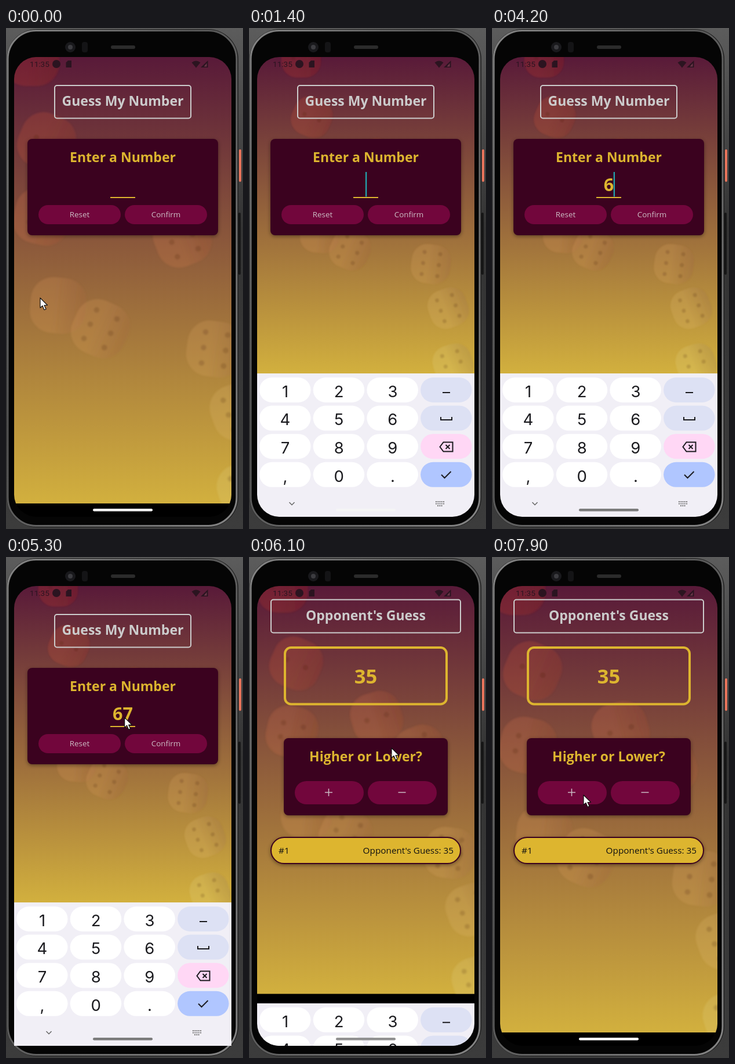
Recreate the animation shown at these times as an HTML page. Size 409 by 863 pixels, loop 8 s.

```html
<!DOCTYPE html>
<html lang="en">
<head>
<meta charset="utf-8">
<title>Number guessing game</title>
<style>
html, body { margin: 0; width: 100%; height: 100%; overflow: hidden; background: #383838; }
svg { display: block; }
text { font: 13.4px "Open Sans", sans-serif; text-anchor: middle; fill: #cbbcc4; }
.title { font-size: 23px; font-weight: 700; fill: #ccc; }
.gold { font-size: 23px; font-weight: 700; fill: #ddb52f; }
.input { font-size: 30.6px; }
.guess { font-size: 34.5px; }
.log { font-size: 15.3px; fill: #111; }
.clock { font: 13.6px Roboto, sans-serif; fill: #2b1420; text-anchor: start; }
.digit { font: 27.5px Inter, sans-serif; fill: #1b1b1f; }
.frame { fill: none; stroke: #ccc; stroke-width: 2; }
.card { fill: #3b021f; }
.raised { filter: drop-shadow(0 2px 3px #0006); }
.button { fill: #72063c; }
.line { fill: none; stroke: #1b1b1f; stroke-width: 2; }
</style>
</head>
<body>
<svg width="409" height="863">
  <defs>
    <linearGradient id="wall" x2="0" y2="1"><stop stop-color="#5c5c5c"/><stop offset=".4" stop-color="#333"/><stop offset="1" stop-color="#3c3c3c"/></linearGradient>
    <linearGradient id="sky" x2="0" y2="1"><stop stop-color="#591a39"/><stop offset="1" stop-color="#d2b03e"/></linearGradient>
    <linearGradient id="rim" x2="1" y2="1"><stop stop-color="#858585"/><stop offset=".4" stop-color="#555"/><stop offset="1" stop-color="#858585"/></linearGradient>
    <linearGradient id="shade"><stop offset=".4" stop-color="#40100c" stop-opacity="0"/><stop offset="1" stop-color="#40100c" stop-opacity=".12"/></linearGradient>
    <clipPath id="screen"><rect x="14" y="50" width="375" height="792" rx="38"/></clipPath>
    <clipPath id="page"><rect x="-80" y="50" width="563" height="769"/></clipPath>
    <filter id="soft"><feGaussianBlur stdDeviation="1.5"/></filter>
  </defs>

  <rect width="409" height="863" fill="url(#wall)"/>
  <rect x="402" y="209" width="4" height="56" rx="2" fill="#e8735a"/>
  <rect x="401" y="318" width="4" height="107" rx="2" fill="#161616"/>
  <rect x="1" y="2" width="400" height="858" rx="52" fill="#1c1c1c"/>
  <rect x="3" y="4.5" width="395" height="853" rx="49" fill="#050505" stroke="url(#rim)" stroke-width="3"/>
  <circle cx="111" cy="33" r="9" fill="#19191c"/>
  <circle cx="111" cy="33" r="4" fill="#3c3c40"/>
  <rect x="131" y="24" width="10" height="18" rx="4" fill="#141416"/>
  <rect x="181" y="30" width="42" height="6" rx="3" fill="#2b2b2b"/>

  <g clip-path="url(#screen)">
    <rect x="14" y="50" width="375" height="792"/>
    <g id="backdrop">
      <g clip-path="url(#page)">
        <rect x="-80" y="50" width="563" height="769" fill="url(#sky)"/>
        <g id="dice" filter="url(#soft)"></g>
      </g>
    </g>

    <text class="clock" x="41" y="67">11:35</text>
    <g fill="#2b1420">
      <circle cx="87" cy="62" r="7"/>
      <path d="M107 56h6v12h-9.5v-8.5z"/>
      <path d="M320.5 59.5Q328 53.5 335.5 59.5L328 68.5z"/>
      <path d="M348.5 56v12h-12.5z"/>
    </g>
    <path d="M346.5 60.5v6h-5z" fill="#6a3548"/>

    <g id="start">
      <rect class="frame" x="84" y="99" width="235" height="56.5" rx="4"/>
      <text class="title" x="201.5" y="134">Guess My Number</text>
      <rect class="card raised" x="37" y="191" width="329" height="166" rx="8"/>
      <text class="gold" x="201.5" y="230.5">Enter a Number</text>
      <text class="gold input" id="entry" x="201.5" y="281"></text>
      <rect x="180" y="291" width="43" height="2" fill="#ddb52f"/>
      <rect id="caret" y="248" width="2.2" height="42.5" fill="#22a9b4"/>
      <rect class="button" x="56" y="305" width="142" height="33" rx="16.5"/>
      <text x="127" y="326">Reset</text>
      <g id="confirm">
        <rect class="button" x="205" y="305" width="142" height="33" rx="16.5"/>
        <text x="276" y="326">Confirm</text>
      </g>
    </g>

    <g id="game">
      <rect class="frame" x="38" y="73.5" width="327" height="57" rx="4"/>
      <text class="title" x="201.5" y="109">Opponent's Guess</text>
      <rect x="62" y="156" width="279" height="97.5" rx="10.5" fill="none" stroke="#ddb52f" stroke-width="4"/>
      <text class="gold guess" x="201.5" y="218">35</text>
      <rect class="card raised" x="60" y="312" width="283" height="133" rx="8"/>
      <text class="gold" x="201.5" y="352">Higher or Lower?</text>
      <rect class="button" x="79" y="386" width="119" height="40" rx="20"/>
      <rect class="button" x="205" y="386" width="119" height="40" rx="20"/>
      <path d="M131 405.500h13m-6.500-6.500v13M257.500 405.500h13" fill="none" stroke="#cbbcc4" stroke-width="1.5"/>
      <rect class="raised" x="38" y="483" width="327" height="45" rx="22.5" fill="#ddb52f" stroke="#3b021f" stroke-width="2"/>
      <text class="log" x="51" y="511" style="text-anchor:start">#1</text>
      <text class="log" x="353" y="511" style="text-anchor:end">Opponent's Guess: 35</text>
    </g>

    <g id="keyboard">
      <rect x="14" y="595" width="375" height="247" fill="#f1eff6"/>
      <g id="keys"></g>
      <path class="line" d="M334 628h13M331 670v5h19v-5M335.5 713.5h16v16h-16l-6-8zM339.5 718l7 7m0-7l-7 7M332 769.5l5.5 5.5 11-11"/>
      <path class="line" d="M69.5 817l4.5 4.5 4.5-4.5" style="stroke:#666;stroke-width:1.5"/>
      <path d="M322 816h15M322 819.5h15M325 823h9" stroke="#777" stroke-width="2" stroke-dasharray="2 1.25"/>
    </g>
    <rect id="pill" x="150" y="828" width="103" height="4.5" rx="2.2"/>
  </g>
  <path id="cursor" d="M0 0v17l4-3.500 3 7 3-1.200-3-6.800h5.500z" fill="#fff" stroke="#111" stroke-width="1.2" stroke-linejoin="round"/>
</svg>
<script>
const $ = id => document.getElementById(id);
const set = (id, name, value) => $(id).setAttribute(name, value);
const show = (id, on) => { $(id).style.display = on ? '' : 'none'; };
const range = n => [...Array(n).keys()];
const clamp = (v, lo, hi) => Math.min(hi, Math.max(lo, v));

// Soft dice: pips sit in two columns, the tint warms from red to yellow down the page
function die([x, y, pips], i) {
  const size = 96, half = size / 2, rows = Math.ceil(pips / 2);
  const face = fill => `<rect x="${-half}" y="${-half}" width="${size}" height="${size}" rx="${size * .4}" fill="${fill}"/>`;
  const dots = range(pips).map(n => `<circle r="5" opacity=".17" fill="#40200c"
    cx="${(n % 2 - .5) * size * .4}" cy="${((n >> 1) - (rows - 1) / 2) * size * .28}"/>`);
  return `<g transform="translate(${x} ${y}) rotate(${24 * Math.sin(1.3 * i)})">
    <g opacity=".22">${face(`hsl(${y / 17},65%,${48 + y / 35}%)`)}</g>${face('url(#shade)')}${dots.join('')}</g>`;
}
$('dice').innerHTML = [
  [44, 52, 1], [70, 196, 2], [62, 325, 4], [222, 298, 2], [304, 362, 6],
  [90, 478, 0], [163, 518, 6], [360, 553, 6], [402, 660, 6], [414, 796, 5]
].map(die).join('');

const sideFill = ['#dde1f4', '#dde1f4', '#ffd7f5', '#b0c6ff'];
$('keys').innerHTML = [...'123 456 789 ,0. '].map((key, i) => {
  const col = i % 4, row = i >> 2, x = 18 + col * 92.7, y = 602 + row * 48.6;
  return `<rect x="${x}" y="${y}" width="88.5" height="43" rx="21.5" fill="${col == 3 ? sideFill[row] : '#fff'}"/>
    <text class="digit" x="${x + 44.5}" y="${y + 33.7}">${key}</text>`;
}).join('');

const ramp = (t, from, to) => clamp((t - from) / (to - from), 0, 1);
const smooth = k => k * k * (3 - 2 * k);
const easeOut = k => 1 - (1 - k) ** 3;

const TAP = 1300, FIRST = 4200, SECOND = 4700, SWITCH = 6100;

function draw(t) {
  const playing = t >= SWITCH;
  show('start', !playing);
  show('game', playing);
  set('confirm', 'opacity', t >= 5900 ? .7 : 1);

  // Each key press restarts the caret's blink; it rests a while before the first digit
  const entry = '67'.slice(0, (t >= FIRST) + (t >= SECOND));
  const rest = entry ? 0 : clamp(t - 2400, 0, 900);
  const age = t - rest - [TAP, FIRST, SECOND][entry.length];
  $('entry').textContent = entry;
  set('caret', 'x', 201 + entry.length * 8.75);
  show('caret', age >= 0 && Math.floor(age / 500) % 2 == 0);

  // The page shrinks to the space above the keyboard
  const up = easeOut(ramp(t, 1100, 1400)) - easeOut(ramp(t, 6000, 6300));
  set('backdrop', 'transform', `translate(201.5 50) scale(${1 - .291 * up}) translate(-201.5 -50)`);
  set('keyboard', 'transform', `translate(0 ${247 * (1 - up)})`);

  const grey = 245 - 122 * ramp(t, 2000, 2400) + 67 * ramp(t, 6000, 6300) + 65 * ramp(t, 6900, 7700);
  set('pill', 'fill', `rgb(${grey},${grey},${grey})`);

  const toInput = smooth(ramp(t, 0, 1000));
  const toConfirm = smooth(ramp(t, 5100, 5900));
  const toPlus = smooth(ramp(t, 6900, 7900));
  show('cursor', t < TAP || t >= 5200);
  set('cursor', 'transform', `translate(${59 + 138 * toInput + 49 * toConfirm - 88 * toPlus}
    ${465 - 198 * toInput + 62 * toConfirm + 81 * toPlus})`);
}

const begin = performance.now();
function frame() {
  const t = (performance.now() - begin) % 8000;
  draw(t - t % 100);
  requestAnimationFrame(frame);
}
frame();
</script>
</body>
</html>
```
